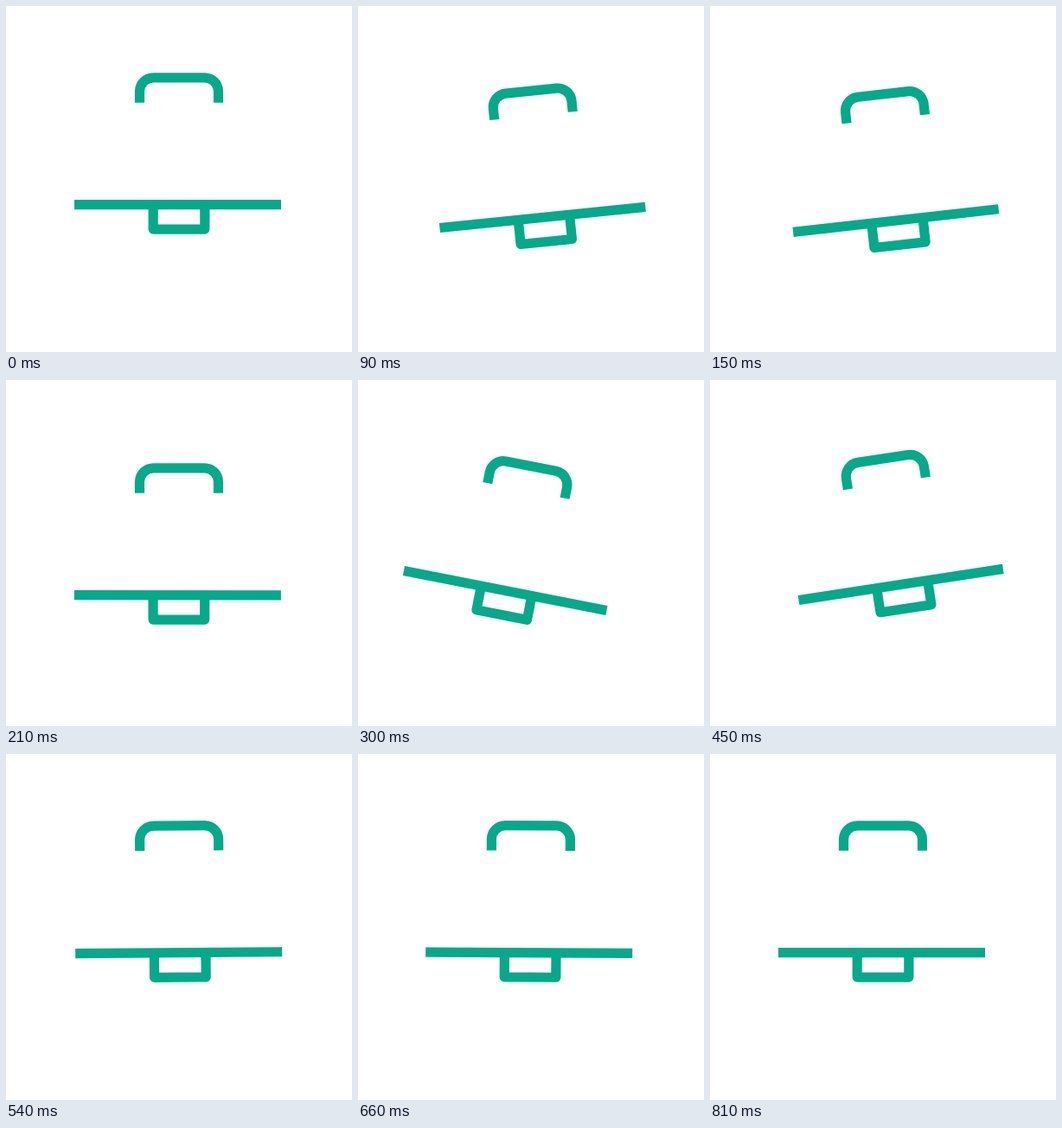
Write an HTML page that moves like this. It is 400 px wide and 400 px high and loops after 0.84 s.

```html
<!DOCTYPE html>
<html lang="en">
<head>
<meta charset="utf-8">
<title>Swinging briefcase</title>
<style>
  html, body { margin: 0; width: 100%; height: 100%; overflow: hidden; background: #fff; }
  svg { display: block; width: 100%; height: 100%; }
  path { fill: none; stroke: #08a88a; stroke-width: 11.2; stroke-linejoin: round; }
</style>
</head>
<body>
<svg viewBox="0 0 400 400">
  <g id="case">
    <path d="M154.5 111.7V98.8A16 16 0 0 1 170.5 82.8H229.5A16 16 0 0 1 245.5 98.8V111.7"/>
    <path d="M79 229.7H318"/>
    <path d="M170.2 229.7V258.1H229.8V229.7"/>
  </g>
</svg>
<script>
  const LOOP = 840, STEP = 30;
  const DIP = 19.3, LOW = 165, LAND = 540;
  // [time in ms, angle in degrees]
  const SWING = [[0, 0], [125, -7.1], [328, 12], [465, -9.3], [576, 2.3], [729, -1.15], [810, 0], [LOOP, 0]];
  const box = document.getElementById('case');

  const ease = u => (1 - Math.cos(Math.PI * u)) / 2;

  function angle(t) {
    const i = SWING.findIndex(([end]) => t < end);
    const [t0, a0] = SWING[i - 1], [t1, a1] = SWING[i];
    return a0 + (a1 - a0) * ease((t - t0) / (t1 - t0));
  }

  // Quick sink, then an accelerating return
  function drop(t) {
    if (t >= LAND) return 0;
    const u = t < LOW ? 1 - t / LOW : (t - LOW) / (LAND - LOW);
    return DIP * (1 - u * u);
  }

  function draw() {
    const t = Math.floor((performance.now() % LOOP) / STEP) * STEP;
    box.setAttribute('transform', `translate(0 ${drop(t)}) rotate(${angle(t)} 200 82.8)`);
    requestAnimationFrame(draw);
  }
  draw();
</script>
</body>
</html>
```
